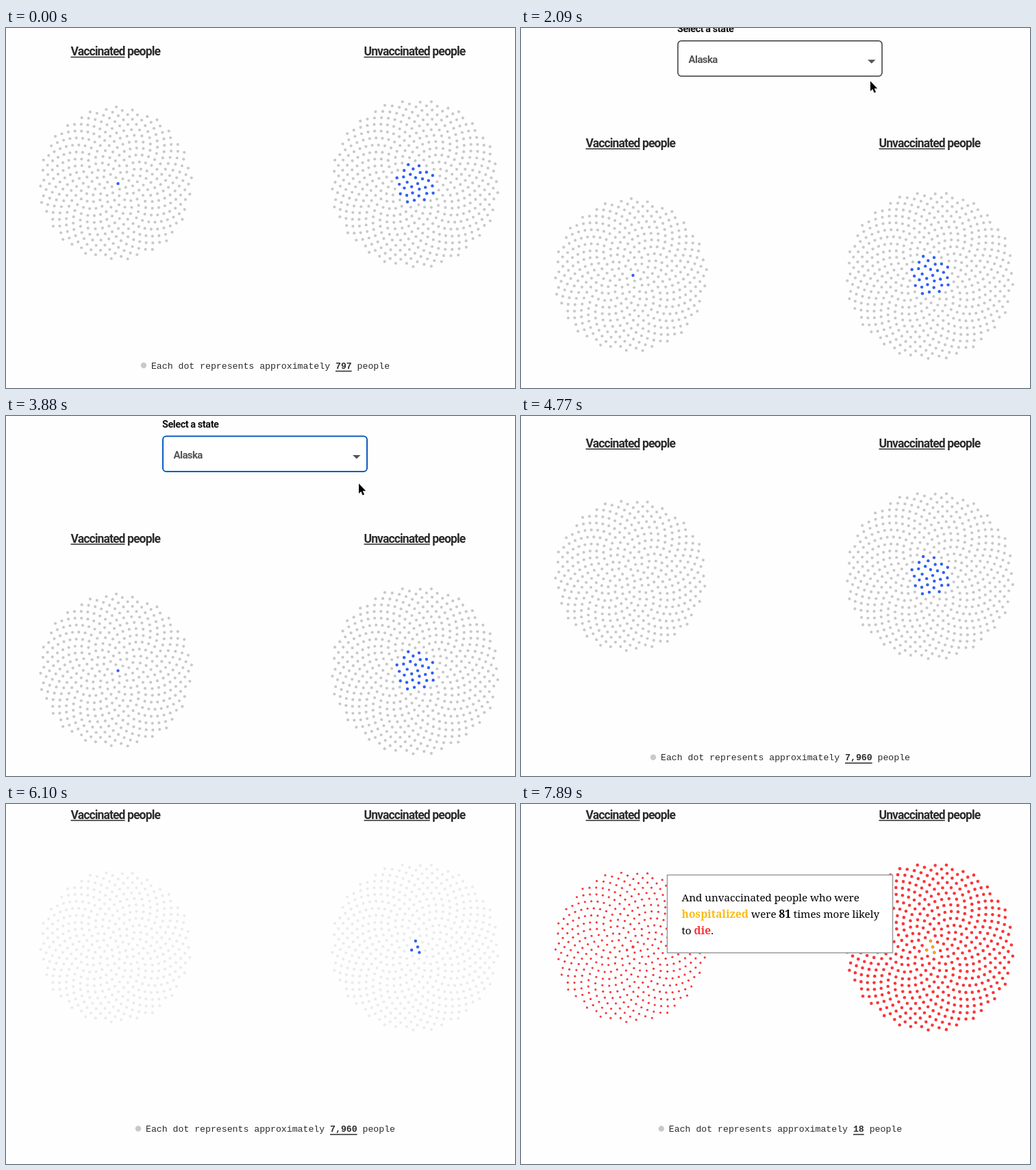
These frames come from a looping animation (743x525 px, 8 s). An HTML page with a canvas:

```html
<!DOCTYPE html>
<html lang="en">
<head>
<meta charset="utf-8">
<title>Dots by vaccination status</title>
<style>
  html, body { margin: 0; width: 100%; height: 100%; overflow: hidden; background: #fefefe; }
  canvas { display: block; width: 743px; height: 525px; }
</style>
</head>
<body>
<canvas id="stage"></canvas>
<script>
const W = 743, H = 525, LOOP = 8000;
const canvas = document.getElementById('stage');
const ctx = canvas.getContext('2d');
const ratio = window.devicePixelRatio || 1;
canvas.width = W * ratio;
canvas.height = H * ratio;
ctx.scale(ratio, ratio);

const GREY = [201, 201, 201], FAINT = [235, 235, 235];
const BLUE = [48, 95, 245], YELLOW = [251, 187, 20], RED = [250, 54, 58];
const INK = '#2b2b2b';
const SANS = 'Roboto, "Liberation Sans", sans-serif';
const TITLE = { font: `bold 17.5px ${SANS}`, gap: -0.87, color: INK };
const SMALL = { font: `bold 14.5px ${SANS}`, gap: -0.45, color: '#111' };
const FIELD = { font: `bold 15px ${SANS}`, gap: -0.6, color: '#555' };
const MONO = { font: '13.2px "Liberation Mono", monospace', color: INK };
const MONO_BOLD = { ...MONO, font: `bold ${MONO.font}` };
const MENU = { font: '18.15px "Liberation Sans", Arial, sans-serif', color: '#262626' };
const SERIF = { font: '15.3px "Noto Serif", serif', gap: -0.07, color: '#000' };
const STRONG = { font: 'bold 15.6px "Noto Serif", serif', gap: 0.05, color: '#000' };

const STATES = ['Alaska', 'Arizona', 'Arkansas', 'California', 'Connecticut', 'Delaware',
  'District of Columbia', 'Idaho', 'Indiana', 'Maine', 'Massachusetts', 'Michigan',
  'Montana', 'Nebraska', 'New Jersey', 'New Mexico', 'Oklahoma'];

// Bursts of movement: start, end, number of steps
const BURSTS = [
  [900, 1500, 5], [1800, 2240, 4], [2540, 3440, 7], [3590, 4320, 6],
  [4620, 5510, 7], [5800, 6400, 5], [6700, 6850, 2], [7300, 7890, 5]
];
// Page scroll before the first burst and after each one
const SCROLL = [144.5, 68.5, 0, 0, 0, 700, 1700, 1768, 1782];

const clamp = v => Math.max(0, Math.min(1, v));
const smooth = v => v * v * (3 - 2 * v);
const lerp = (a, b, p) => a + (b - a) * p;
const mix = (a, b, p) => a.map((v, i) => lerp(v, b[i], p));
const rgb = c => `rgb(${c.map(Math.round).join(',')})`;

function stepsDone(t, [start, end, count]) {
  if (t < start) return 0;
  const step = (end - start) / (count - 1);
  return Math.min(count, Math.floor((t - start) / step + 0.05) + 1);
}

function setStyle(s) {
  ctx.font = s.font;
  ctx.letterSpacing = (s.gap || 0) + 'px';
  ctx.fillStyle = s.color;
}

function widthOf(text, s) {
  setStyle(s);
  return ctx.measureText(text).width;
}

// Draws one run of text and returns where the next one begins
function write(text, x, y, s, underline) {
  const w = widthOf(text, s);
  ctx.fillText(text, x, y);
  if (underline) ctx.fillRect(x, y + underline, w, 1.5);
  return x + w;
}

function disc(x, y, r, color) {
  ctx.beginPath();
  ctx.arc(x, y, r, 0, 7);
  ctx.fillStyle = color;
  ctx.fill();
}

function roundBox(x, y, w, h, r) {
  ctx.beginPath();
  ctx.roundRect(x, y, w, h, r);
}

function swirl(cx, cy, count, look) {
  const turn = Math.PI * (3 - Math.sqrt(5));
  for (let i = 0; i < count; i++) {
    const r = 5.5 * Math.sqrt(i + 0.5);
    const dot = look(i);
    const x = cx + r * Math.cos(i * turn), y = cy + r * Math.sin(i * turn);
    disc(x, y, dot.r, rgb(dot.color));
    if (dot.ring) {
      ctx.lineWidth = 0.8;
      ctx.strokeStyle = `rgba(205,95,40,${dot.ring})`;
      ctx.stroke();
    }
  }
}

function drawDots(top, k) {
  const arizona = k[3] >= 4;
  const base = mix(GREY, FAINT, clamp(k[5] / 3));
  const red = clamp(k[7] / 4), grow = k[7] / 5;
  const fade = clamp((k[4] - 3) / 2.5);
  const cy = top + 193.4;

  swirl(159.6, cy, arizona ? 406 : 415, i => {
    if (i === 0 && !arizona) return { r: 2.2, color: BLUE };
    const end = i === 0 ? 2.2 : i === 1 ? 1.9 : 1.6;
    return { r: lerp(2.1, end, grow), color: mix(base, RED, red) };
  });

  swirl(597.1, cy, 500, i => {
    if (i < 4) {
      return {
        r: lerp(2.2, 1.9, grow),
        color: mix(BLUE, YELLOW, clamp((k[5] - 3) / 2)),
        ring: grow
      };
    }
    if (i < 30 && fade < 1) {
      return { r: 2.2 - 0.7 * Math.sin(Math.PI * fade), color: mix(BLUE, GREY, fade) };
    }
    return { r: lerp(2.1, 2.3, grow), color: mix(base, RED, red) };
  });
}

function drawTitles(top) {
  const y = top + 6.5;
  [['Vaccinated', 94.5], ['Unvaccinated', 522.5]].forEach(([word, x]) => {
    write(' people', write(word, x, y, TITLE, 1.7), y, TITLE);
  });
}

function drawLegend(top, number) {
  const lead = 'Each dot represents approximately ', tail = ' people';
  const w = widthOf(lead + number + tail, MONO);
  const x = 386 - w / 2, y = top + 463;
  disc(x - 11, y - 4.5, 4.2, rgb(GREY));
  let end = write(lead, x, y, MONO);
  end = write(number, end, y, MONO_BOLD, 3.2);
  write(tail, end, y, MONO);
}

function drawSelect(top, name, focus) {
  if (top < -60) return;
  write('Select a state', 228, top - 12.5, SMALL);
  roundBox(229, top, 298, 51.5, 5);
  ctx.fillStyle = '#fff';
  ctx.fill();
  ctx.lineWidth = focus ? 2 : 1.5;
  ctx.strokeStyle = focus ? '#0b5cbf' : '#3a3a3a';
  ctx.stroke();
  write(name, 244.5, top + 32, FIELD);
  ctx.beginPath();
  ctx.moveTo(506, top + 27.5);
  ctx.lineTo(517.5, top + 27.5);
  ctx.lineTo(511.8, top + 33);
  ctx.fill();
}

function drawMenu(active, alpha) {
  ctx.save();
  ctx.globalAlpha = alpha;
  ctx.shadowColor = 'rgba(0,0,0,0.18)';
  ctx.shadowBlur = 10;
  roundBox(219.5, 38, 301, 540, 6);
  ctx.fillStyle = '#e4e4e4';
  ctx.fill();
  ctx.shadowColor = 'transparent';
  ctx.lineWidth = 1;
  ctx.strokeStyle = '#bdbdbd';
  ctx.stroke();
  roundBox(225, 43 + 28 * active, 290, 28, 4);
  ctx.fillStyle = '#549bfc';
  ctx.fill();
  STATES.forEach((name, i) => {
    write(name, 244, 64 + 28 * i, { ...MENU, color: i === active ? '#fff' : MENU.color });
  });
  ctx.beginPath();
  ctx.moveTo(230, 58.5);
  ctx.lineTo(233, 62);
  ctx.lineTo(238.5, 53.5);
  ctx.lineWidth = 1.8;
  ctx.strokeStyle = active ? MENU.color : '#fff';
  ctx.stroke();
  ctx.restore();
}

// Each line is a list of plain strings and [string, color] pairs for bold runs
function drawCard(y, lines) {
  const top = Math.round(y), h = 41.5 + 24 * lines.length;
  if (top > H || top + h < 0) return;
  ctx.fillStyle = '#fff';
  ctx.fillRect(213.5, top + 0.5, 329, h);
  ctx.lineWidth = 1.5;
  ctx.strokeStyle = '#9a9c9c';
  ctx.strokeRect(213.5, top + 0.5, 329, h);
  lines.forEach((line, i) => {
    let x = 234.5;
    for (const run of line) {
      const bold = Array.isArray(run);
      const s = bold ? { ...STRONG, color: run[1] || STRONG.color } : SERIF;
      x = write(bold ? run[0] : run, x, top + 38.5 + 24 * i, s);
    }
  });
}

const INFECTED = [
  ['In ', ['Arizona'], ', where ', ['44'], ' percent of the'],
  ['state is vaccinated, those who were'],
  ['unvaccinated were ', ['13'], ' times more likely'],
  ['to be ', ['infected with Covid', rgb(BLUE)], ' between'],
  ['May 1 - Jun 30, 2021.']
];
const DEATHS = [
  ['And unvaccinated people who were'],
  [['hospitalized', rgb(YELLOW)], ' were ', ['81'], ' times more likely'],
  ['to ', ['die', rgb(RED)], '.']
];

function drawCursor(k) {
  if (!k[0] || k[4]) return;
  const a = k[1] / 4, b = clamp((k[2] - 3) / 3), c = clamp(k[3] / 2);
  const x = 516 - 8 * a + 3 * b + 4 * c;
  const y = 131.5 - 72 * a + 26 * b + 13 * c;
  const shape = [[0, 0], [0, 14.5], [3.3, 11.5], [5.6, 17], [8, 16], [5.7, 10.7], [10.2, 10.7]];
  ctx.beginPath();
  shape.forEach(([px, py]) => ctx.lineTo(x + px, y + py));
  ctx.closePath();
  ctx.lineWidth = 2;
  ctx.strokeStyle = '#fff';
  ctx.stroke();
  ctx.fillStyle = '#000';
  ctx.fill();
}

function draw(t) {
  const k = BURSTS.map(b => stepsDone(t, b));
  let scroll = SCROLL[0];
  k.forEach((n, i) => {
    scroll += (SCROLL[i + 1] - SCROLL[i]) * smooth(n / BURSTS[i][2]);
  });
  const top = Math.max(15, 178 - scroll);
  const arizona = k[3] >= 4;

  ctx.fillStyle = '#fefefe';
  ctx.fillRect(0, 0, W, H);
  drawTitles(top);
  drawDots(top, k);
  drawLegend(top, k[7] >= 2 ? '18' : arizona ? '7,960' : '797');
  drawSelect(29.5 - scroll, arizona ? 'Arizona' : 'Alaska', k[2] > 0);
  if (k[2] && k[3] < 2) drawMenu(k[2] >= 5 ? 1 : 0, k[3] ? 0.5 : 1);
  drawCard(851 - scroll, INFECTED);
  drawCard(1885 - scroll, DEATHS);
  drawCursor(k);
}

function tick() {
  draw(performance.now() % LOOP);
  requestAnimationFrame(tick);
}
tick();
</script>
</body>
</html>
```
